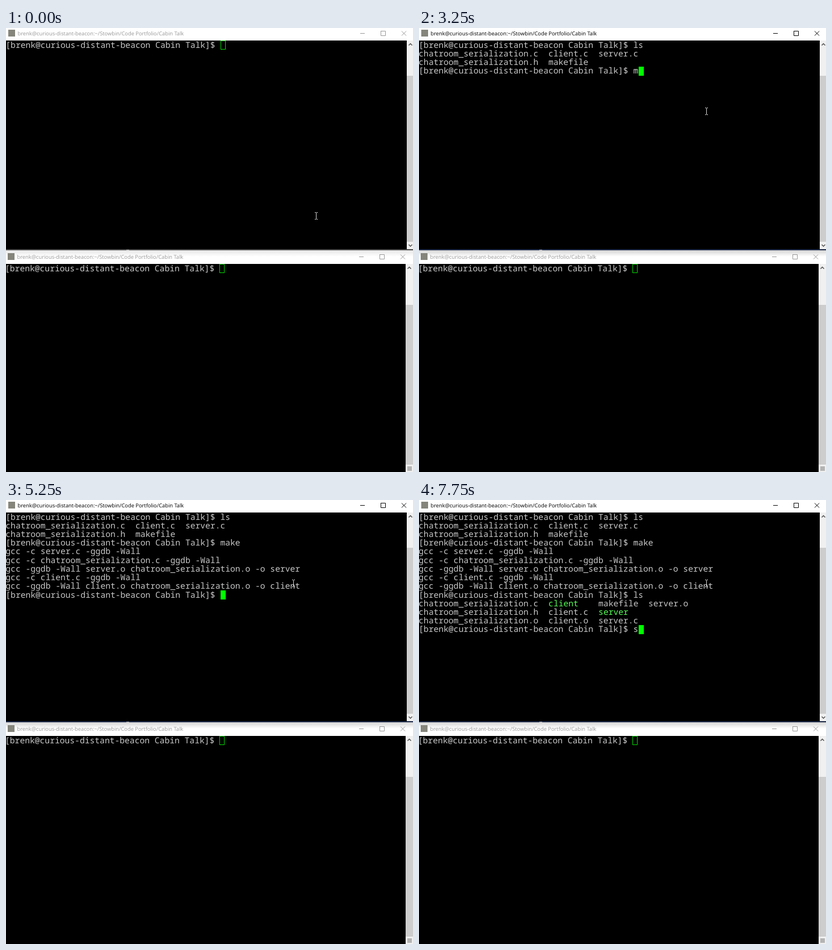
Write an HTML page with a canvas that moves like this. It is 717 by 781 pixels and loops after 8 s.

```html
<!DOCTYPE html>
<html lang="en">
<head>
<meta charset="utf-8">
<title>Terminal session</title>
<style>
  html, body { margin: 0; width: 100%; height: 100%; overflow: hidden; background: #000; }
  canvas { display: block; }
</style>
</head>
<body>
<canvas id="stage" width="717" height="781"></canvas>
<script>
const ctx = document.getElementById('stage').getContext('2d');
const LOOP = 8000;
const CELL = 8.8, ROW = 15.23;
const MONO = '500 14.667px "Noto Sans Mono", monospace';
const SANS = '9.32px "Open Sans", sans-serif';
const TITLE = 'brenk@curious-distant-beacon:~/Stowbin/Code Portfolio/Cabin Talk';
const PROMPT = '[brenk@curious-distant-beacon Cabin Talk]$ ';

// Terminal output by time; braces mark executables, shown in green.
const LOG = [
  [0, PROMPT],
  [1750, 'l'],
  [2000, 's'],
  [2250, '\nchatroom_serialization.c  client.c  server.c' +
         '\nchatroom_serialization.h  makefile\n' + PROMPT],
  [3250, 'm'],
  [3750, 'a'],
  [4250, 'k'],
  [4500, 'e'],
  [4750, '\ngcc -c server.c -ggdb -Wall' +
         '\ngcc -c chatroom_serialization.c -ggdb -Wall\n'],
  [5000, 'gcc -ggdb -Wall server.o chatroom_serialization.o -o server' +
         '\ngcc -c client.c -ggdb -Wall' +
         '\ngcc -ggdb -Wall client.o chatroom_serialization.o -o client\n'],
  [5250, PROMPT],
  [6000, 'l'],
  [6500, 's'],
  [6750, '\nchatroom_serialization.c  {client}    makefile  server.o' +
         '\nchatroom_serialization.h  client.c  {server}' +
         '\nchatroom_serialization.o  client.o  server.c\n' + PROMPT],
  [7750, 's']
];

function box(color, x, y, w, h) {
  ctx.fillStyle = color;
  ctx.fillRect(x, y, w, h);
}

function text(str, x, y, font, color) {
  ctx.font = font;
  ctx.fillStyle = color;
  ctx.fillText(str, x, y);
}

function path(color, width, ...lines) {
  ctx.strokeStyle = color;
  ctx.lineWidth = width;
  ctx.beginPath();
  for (const [x, y, ...rest] of lines) {
    ctx.moveTo(x, y);
    for (let i = 0; i < rest.length; i += 2) ctx.lineTo(rest[i], rest[i + 1]);
  }
  ctx.stroke();
}

// left: icon edge, right: edge of the window buttons, mid: vertical centre.
function titleBar(left, right, mid, active) {
  const ink = active ? '#000' : '#999';
  box('#85857c', left, mid - 6.5, 12, 12);
  text(TITLE, left + 16.5, mid + 3.5, SANS, ink);
  path(ink, 1,
    [right, mid, right + 8, mid],
    [right + 36.5, mid - 4, right + 44.5, mid - 4, right + 44.5, mid + 4,
     right + 36.5, mid + 4, right + 36.5, mid - 4.5],
    [right + 73, mid - 4, right + 81, mid + 4],
    [right + 81, mid - 4, right + 73, mid + 4]);
}

function arrow(x, y, dir) {
  path('#505050', 1.5, [x - 3, y + 1.5 * dir, x, y - 1.5 * dir, x + 3, y + 1.5 * dir]);
}

function scrollBar(x, top, bottom, thumbTop, thumbBottom) {
  box('#f0f0f0', x, top, 717 - x, bottom - top);
  box('#cdcdcd', x, thumbTop, 717 - x, thumbBottom - thumbTop);
  arrow(x + 6.5, top + 7, 1);
}

function terminal(log, x, y, active) {
  const rows = log.split('\n');
  rows.forEach((row, r) => {
    let col = 0;
    row.split(/[{}]/).forEach((part, i) => {
      text(part, x + col * CELL, y + 12 + r * ROW, MONO, i % 2 ? '#55ff55' : '#c8c8c8');
      col += part.length;
    });
  });
  const last = rows.length - 1;
  const cx = Math.round(x + rows[last].length * CELL);
  const cy = Math.floor(y + last * ROW);
  if (active) {
    box('#0f0', cx, cy, 9, 16);
  } else {
    ctx.strokeStyle = '#00d800';
    ctx.lineWidth = 1;
    ctx.strokeRect(cx + 0.5, cy + 0.5, 8, 15);
  }
}

function textPointer(x, y) {
  path('#d8d8d8', 1,
    [x + 0.5, y - 5, x + 0.5, y + 6],
    [x - 2, y - 5.5, x, y - 5.5], [x + 1, y - 5.5, x + 3, y - 5.5],
    [x - 2, y + 6.5, x, y + 6.5], [x + 1, y + 6.5, x + 3, y + 6.5]);
}

// The upper window casts a shadow on the lower one, stronger when focused.
function windowShadow(active) {
  const shade = ctx.createLinearGradient(0, 391, 0, 402);
  shade.addColorStop(0, active ? '#d4d4d4' : '#e6e6e6');
  shade.addColorStop(1, '#fff');
  box(shade, 0, 391, 717, 24);
}

function draw(t) {
  const active = t >= 750;
  const log = LOG.filter(([at]) => at <= t).map(([, out]) => out).join('');

  box('#000', 0, 0, 717, 781);
  box('#fff', 0, 0, 717, 22);
  titleBar(4, 624, 9.5, active);
  scrollBar(706, 22, 389, 84, 376);
  arrow(712.5, 382.5, -1);
  terminal(log, -0.7, 22.5, active);

  box(active ? '#1d2a48' : '#484848', 0, 389, 717, 2);
  box('#a0a0a0', 212, 390, 5, 1);

  windowShadow(active);
  titleBar(3, 622, 402.5, false);
  scrollBar(704, 415, 781, 487, 768);
  box('#b4b4b4', 707, 771, 8, 8);
  terminal(PROMPT, -2, 415.7, false);

  if (t < 250) textPointer(546, 330);
  else textPointer(506, 146);
}

ctx.textRendering = 'geometricPrecision';
const start = performance.now();
function tick() {
  draw((performance.now() - start) % LOOP);
  requestAnimationFrame(tick);
}
tick();
</script>
</body>
</html>
```
